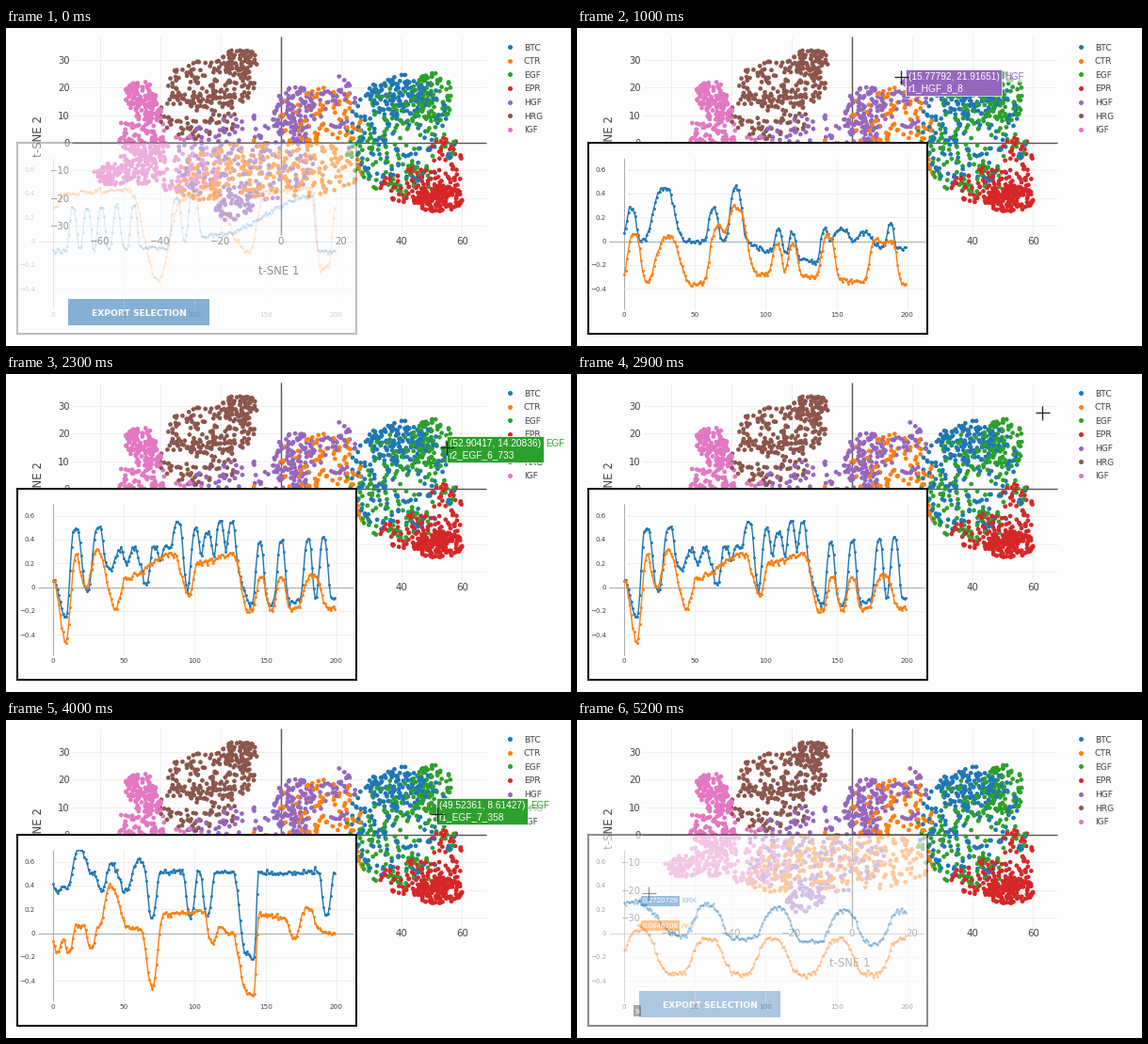
Animation, 600 px wide and 338 px high, one loop 5.3 s. Source, as a matplotlib script:

```python
import numpy as np
import matplotlib.pyplot as plt
from matplotlib.animation import FuncAnimation
from matplotlib.patches import Polygon, Rectangle

W, H, DPI = 600, 338, 100
PX = 72 / DPI  # points per pixel
FRAMES, STEP = 53, 100
PAPER = "#fefdfe"
COLORS = dict(BTC="#1f77b4", CTR="#ff7f0e", EGF="#2ca02c", EPR="#d62728",
              HGF="#9467bd", HRG="#8c564b", IGF="#e377c2")
BLUE, ORANGE = COLORS["BTC"], COLORS["CTR"]
rng = np.random.default_rng(7)

fig = plt.figure(figsize=(W / DPI, H / DPI), dpi=DPI, facecolor=PAPER)
ax = fig.add_axes([0, 0, 1, 1])
ax.set_xlim(0, W)
ax.set_ylim(H, 0)
ax.axis("off")


def label(x, y, s, size, color="#444444", ha="center", z=1, font="DejaVu Sans", **kw):
    return ax.text(x, y, s, fontsize=size * PX, color=color, ha=ha,
                   va=kw.pop("va", "center_baseline"), zorder=z, family=font, **kw)


def line(xs, ys, color, width=1, z=1, **kw):
    return ax.plot(xs, ys, color=color, lw=width * PX, zorder=z,
                   solid_capstyle="butt", **kw)[0]


def box(x0, y0, x1, y1, color, z, edge="none", width=0):
    return ax.add_patch(Rectangle((x0, y0), x1 - x0, y1 - y0, fc=color,
                                  ec=edge, lw=width * PX, zorder=z))


def dots(x, y, color, size, z):
    ax.scatter(x, y, s=(size * PX) ** 2, c=color, lw=0, zorder=z)


def glide(x, xs, ys):
    """Cosine easing between knots."""
    i = np.clip(np.searchsorted(xs, x, side="right") - 1, 0, len(xs) - 2)
    u = np.clip((x - xs[i]) / (xs[i + 1] - xs[i]), 0, 1)
    return ys[i] + (ys[i + 1] - ys[i]) * (1 - np.cos(np.pi * u)) / 2


def signed(s):
    return str(s).replace("-", "\u2212")


def sx(v):
    return 292 + 3.205 * v


def sy(v):
    return 122 - 2.93 * v


# ---- scatter plot ----
def rule(xs, ys, v):
    if v == 0:
        line(xs, ys, "#555555", 1.4, 1.5)
    else:
        line(xs, ys, "#eeeeee")


for v in range(-60, 61, 20):
    rule([sx(v)] * 2, [9, 220], v)
    label(sx(v), 226.5, signed(v), 10.2)
for v in range(-30, 31, 10):
    rule([70, 510], [sy(v)] * 2, v)
    label(68, sy(v), signed(v), 10, ha="right")
label(289.5, 257, "t-SNE 1", 11.6)
label(35, 115, "t-SNE 2", 11.8, rotation=90, va="center")

# clusters: centre x, centre y, radius x, radius y, count
CLUSTERS = dict(
    BTC=[(415, 74, 36, 19, 105), (420, 110, 58, 62, 150)],
    CTR=[(335, 95, 48, 32, 85), (285, 150, 95, 32, 230), (205, 172, 25, 14, 30)],
    EGF=[(453, 74, 23, 26, 100), (418, 120, 58, 58, 160)],
    EPR=[(459, 181, 27, 14, 150), (440, 168, 46, 20, 95), (465, 140, 19, 26, 35)],
    HGF=[(308, 92, 24, 30, 115), (352, 80, 20, 30, 40), (255, 140, 75, 48, 220),
         (240, 188, 22, 17, 50)],
    HRG=[(248, 36, 20, 14, 75), (218, 60, 48, 26, 170), (205, 92, 42, 28, 75)],
    IGF=[(143, 70, 17, 16, 80), (145, 118, 25, 50, 235), (113, 155, 20, 12, 90),
         (190, 145, 40, 32, 95)])
points = []
for k, (name, color) in enumerate(COLORS.items()):
    for cx, cy, rx, ry, n in CLUSTERS[name]:
        r, a = np.sqrt(rng.random(n)), rng.random(n) * 2 * np.pi
        points += [(x, y, color) for x, y in zip(cx + rx * r * np.cos(a),
                                                 cy + ry * r * np.sin(a))]
    y = 20 + 14.65 * k
    dots([535], [y], color, 5, 1)
    label(550, y, name, 9.2, ha="left")
rng.shuffle(points)
xs, ys, cs = zip(*points)
dots(np.array(xs, float), np.array(ys, float), cs, 4.7, 2)

box(66, 288, 216, 316, "#337ab7", 1)
label(141, 302.5, "EXPORT SELECTION", 9.1, "white", weight="bold", z=2)


# ---- point labels ----
def hover(start, end, group, x, y, point, side):
    color, px, py = COLORS[group], sx(x), sy(y)
    d, ha = (1, "left") if side == "right" else (-1, "right")
    body = label(px + 9 * d, py, signed(f"({x:.5f}, {y:.5f})\n{point}"), 10.1, "white",
                 ha, 5, "Liberation Sans", va="center", multialignment=ha,
                 linespacing=1.25, bbox=dict(fc=color, ec="white", lw=0.5, pad=3 * PX))
    tip = ax.add_patch(Polygon([(px, py), (px + 6 * d, py - 5), (px + 6 * d, py + 5)],
                               fc=color, lw=0, zorder=5))
    tag = ax.annotate(group, xy=((d + 1) / 2, 0.78), xycoords=body,
                      xytext=(6 * PX * d, 0), textcoords="offset points",
                      ha=ha, va="center", color=color, fontsize=9.8 * PX,
                      family="Liberation Sans", zorder=5,
                      bbox=dict(fc="white", ec="none", alpha=0.6, pad=1))
    return start, end, (body, tip, tag)


hovers = [
    hover(6, 8, "EGF", 47.60318, 19.46072, "r1_EGF_5_411", "right"),
    hover(10, 11, "HGF", 15.77792, 21.91651, "r1_HGF_8_8", "right"),
    hover(22, 25, "EGF", 52.90417, 14.20836, "r2_EGF_6_733", "right"),
    hover(34, 37, "EGF", 56.46254, 17.74528, "r2_EGF_3_902", "left"),
    hover(39, 41, "EGF", 49.52361, 8.61427, "r1_EGF_7_358", "right"),
    hover(44, 48, "EPR", 53.39153, -25.75047, "r1_EPR_8_1903", "left"),
    hover(49, 49, "EPR", 57.18264, -21.40932, "r2_EPR_4_1276", "right"),
]

# ---- time course panel ----
veil = box(12, 122, 372, 325, PAPER, 6)
panel = [box(12, 122, 372, 325, "none", 9, "black", 2)]


def tx(v):
    return 50 + 1.504 * v


def ty(v):
    return 226.5 - 126.25 * v


def shade(v):
    return "#eeeeee" if v else "#aaaaaa"


for v in range(0, 201, 50):
    panel += [line([tx(v)] * 2, [138, 299], shade(v), 1, 7),
              label(tx(v), 304.5, str(v), 7.3, z=7)]
for k in range(-4, 7, 2):
    v = k / 10
    panel += [line([50 if k else 34, 369], [ty(v)] * 2, shade(v), 1, 7),
              label(31, ty(v), signed(v) if k else "0", 7, ha="right", z=7)]

T = np.arange(200)


def trend(*knots):
    """Eased path through step, value pairs, slightly rough."""
    xs, ys = np.reshape(knots, (-1, 2)).T
    return glide(T, xs, ys) + rng.normal(0, 0.012, T.size)


def pulses(height, width, *centres):
    return sum(height * np.exp(-np.abs((T - c) / width) ** 3) for c in centres)


spikes = (
    trend(0, -.08, 80, -.06, 115, .05, 183, .38, 187, -.08, 199, -.08)
    + pulses(.37, 3, 14, 24, 34, 45, 57) + pulses(.42, 4, 87, 99),
    trend(0, .27, 8, .4, 54, .43, 74, -.32, 91, .35, 108, .45, 138, -.1,
          150, .42, 183, .45, 189, -.25, 195, -.2, 199, .28))
bursts = (
    trend(0, 0, 85, 0, 100, -.08, 135, -.17, 148, 0, 199, -.06)
    + pulses(.45, 9, 28) + pulses(.45, 5, 79) + pulses(.28, 4, 5, 63)
    + pulses(.2, 3, 109, 119, 141, 188) + pulses(.1, 6, 153, 170),
    trend(0, -.37, 55, -.36, 100, -.28, 199, -.36) + pulses(.44, 5.5, 7, 65)
    + pulses(.4, 10, 31) + pulses(.6, 9, 79) + pulses(.26, 4, 108, 119)
    + pulses(.36, 5.5, 144, 178, 188))
plateau = (
    trend(0, 0, 140, 0, 155, -.1, 199, -.06) + pulses(.58, 7, 2, 51)
    + pulses(.56, 3.5, 42, 67, 81, 128) + pulses(.52, 11, 98)
    + pulses(.35, 4, 16, 144, 177, 189, 197),
    trend(0, .52, 66, .5, 74, .02, 82, .52, 98, .5, 123, -.21, 165, -.18,
          180, .12, 199, .24) + pulses(.4, 3, 129, 135, 144))
ripple = (
    trend(0, .06, 9, -.26, 14, .15, 90, .2, 96, -.08, 104, .12, 130, .1,
          140, -.15, 199, -.1)
    + pulses(.35, 4, 16, 32, 88, 109) + pulses(.15, 3.5, 47, 57, 71, 80)
    + pulses(-.18, 3, 24, 66) + pulses(.45, 3.5, 100, 118, 126)
    + pulses(.52, 3.5, 146, 161, 180, 191),
    trend(0, .06, 9, -.46, 16, .26, 23, 0, 31, .32, 44, -.17, 52, .08, 85, .28,
          96, -.07, 102, .2, 128, .28, 137, -.2, 199, -.18)
    + pulses(.28, 4, 147, 161) + pulses(.28, 7, 183))
drops = (
    trend(0, .5, 127, .52, 136, -.18, 142, -.23, 145, .5, 199, .52)
    + pulses(.2, 6, 18) + pulses(.1, 4, 40, 61) + pulses(-.37, 3.5, 70, 97, 109, 193)
    + pulses(-.15, 4, 3, 11, 35, 51),
    trend(0, .04, 33, .08, 40, .4, 54, .04, 62, .02, 70, -.46, 78, .16, 104, .18,
          126, 0, 137, -.5, 142, -.51, 145, .16, 199, 0)
    + pulses(-.2, 3.5, 3, 11, 27, 112) + pulses(.17, 5, 180) + pulses(-.12, 4, 170))
waves = (
    trend(0, -.02, 199, -.09) + pulses(.28, 22, 4) + pulses(.28, 11, 59, 108, 155, 196),
    trend(0, -.34, 199, -.35) + pulses(.36, 13, 11) + pulses(.3, 12, 59, 105, 151, 197))

schedule = [(0, spikes), (7, bursts), (13, plateau), (21, ripple),
            (33, drops), (49, waves)]

window = Rectangle((47, 138), 325, 162, transform=ax.transData)
traces = [line([], [], c, 1.4, 8, marker="o", ms=2.9 * PX, mew=0)
          for c in (BLUE, ORANGE)]
for t in traces:
    t.set_clip_path(window)

# value labels over the time course
readout = [box(60, 303, 67.5, 315, "#444444", 9)]
figures = [label(63.8, 309.5, "9", 8, "white", z=10, font="Liberation Sans")]
for y, value, name, color in ((192, "0.2720729", "ERK", BLUE),
                              (218.5, "0.0848708", "AKT", ORANGE)):
    readout += [box(68, y - 5.5, 109, y + 5.5, color, 9),
                ax.add_patch(Polygon([(63.5, y), (68, y - 3), (68, y + 3)],
                                     fc=color, lw=0, zorder=9)),
                label(111, y, name, 8, color, "left", 10, "Liberation Sans")]
    figures.append(label(88.5, y, value, 8, "white", z=10, font="Liberation Sans"))
panel += readout

# ---- pointer: frame, x, y ----
PATH = np.array([(1, 420, -8), (7, 450, 64), (10, 344, 52), (14, 400, 5),
                 (18, 450, 28), (23, 468, 78), (29, 494, 41), (32, 450, 66),
                 (35, 484, 67), (40, 458, 100), (46, 461, 212), (49, 478, 186),
                 (50, 76, 184)], float)
cross = [line([], [], "#222222", 1.3, 11) for _ in range(2)]


def opacity(i):
    return min(1, 0.25 * (i + 1), 0.45 + 0.275 * (52 - i))


def draw(i):
    a = opacity(i)
    veil.set_alpha(a ** 0.65)
    for item in panel:
        item.set_alpha(a)
    for item in readout + figures:
        item.set_visible(i >= 50)
    pair = [p for start, p in schedule if start <= i][-1]
    for t, values in zip(traces, pair):
        t.set_data(tx(T), ty(values))
        t.set_alpha(a ** 1.5)  # markers and line overlap
    for start, end, items in hovers:
        for item in items:
            item.set_visible(start <= i <= end)
    x, y = (glide(i, PATH[:, 0], PATH[:, k]) for k in (1, 2))
    cross[0].set_data([x - 7.5, x + 7.5], [y, y])
    cross[1].set_data([x, x], [y - 7.5, y + 7.5])
    for c in cross:
        c.set_visible(i > 0)
        c.set_alpha(a if i >= 50 else 1)
    return []


anim = FuncAnimation(fig, draw, frames=FRAMES, interval=STEP,
                     init_func=lambda: draw(0), repeat=True, repeat_delay=0)
plt.show()
```
